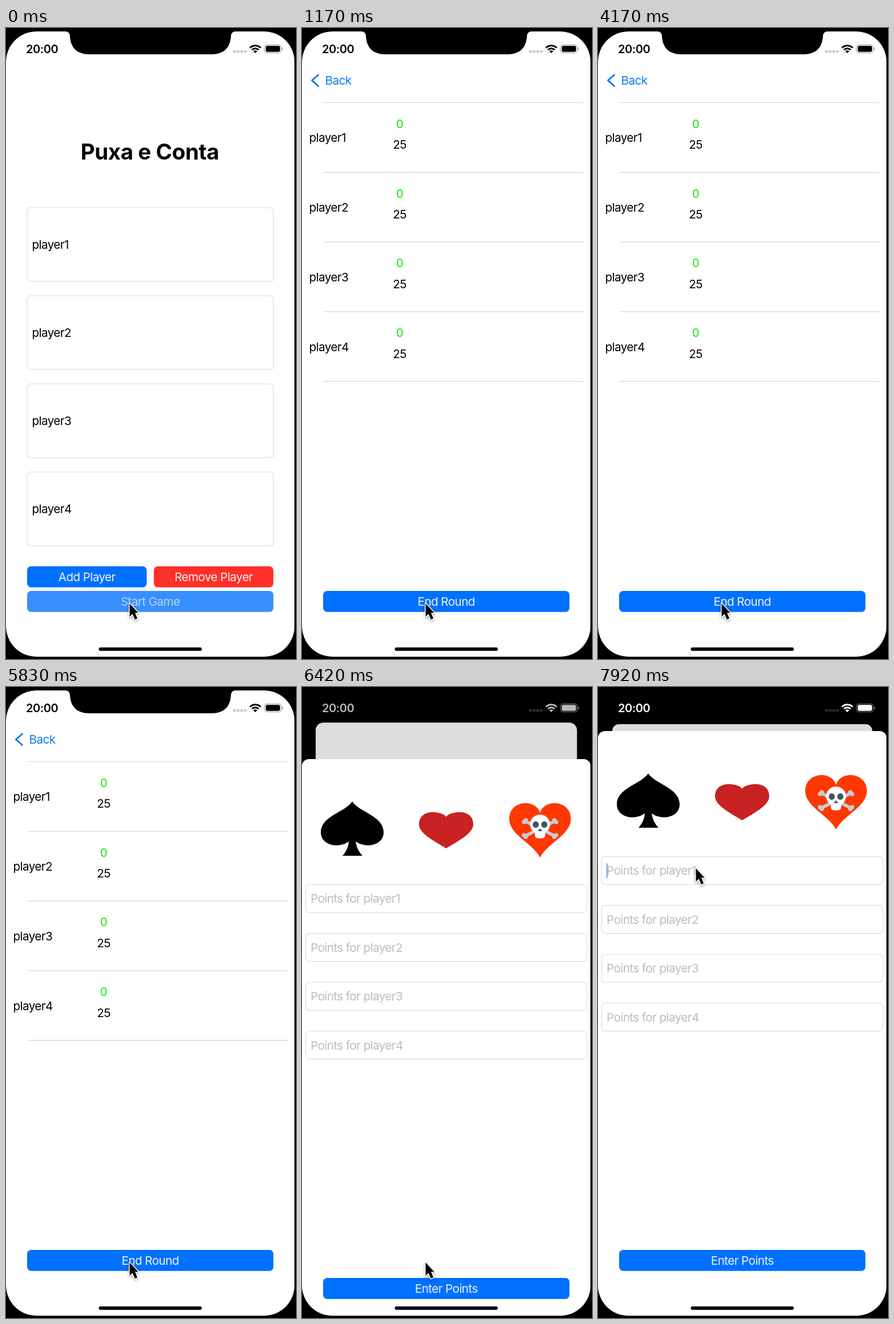
Recreate the animation shown at these times as an HTML page with a canvas. Size 508 by 1103 pixels, loop 8000 ms.

```html
<!DOCTYPE html>
<html lang="en">
<head>
<meta charset="utf-8">
<title>Score keeper</title>
<style>
html, body { margin: 0; height: 100%; overflow: hidden; background: #000; }
canvas { display: block; }
</style>
</head>
<body>
<canvas id="stage" width="508" height="1103"></canvas>
<script>
const LOOP = 8000, FPS = 12;
const BLUE = '#0070ff', RED = '#ff3029';
const WIDTH = 505.5, TOP = 6, BOTTOM = 1099, CORNER = 53, SHEET_TOP = 77;
const PUSH_START = 223, SHEET_START = 6144.3;
const c = document.getElementById('stage').getContext('2d');

const clamp = v => Math.max(0, Math.min(1, v));
const mix = (a, b, p) => a + (b - a) * p;
const ramp = (t, a, b) => clamp((t - a) / (b - a));
const smooth = p => p * p * (3 - 2 * p);
const gray = v => `rgb(${v},${v},${v})`;
const blend = (a, b, p) => `rgb(${a.map((v, i) => Math.round(mix(v, b[i], p)))})`;

// Critically damped spring: share of the way still to go
function remaining(t, start) {
  const x = Math.max(0, t - start) * 0.01762;
  return (1 + x) * Math.exp(-x);
}

function layer(draw) {
  c.save();
  draw();
  c.restore();
}

function box(x, y, w, h, r, fill, stroke) {
  c.beginPath();
  c.roundRect(x, y, w, h, r);
  if (fill) { c.fillStyle = fill; c.fill(); }
  if (stroke) { c.strokeStyle = stroke; c.lineWidth = 1.1; c.stroke(); }
}

function shape(d, fill) {
  c.fillStyle = fill;
  c.fill(new Path2D(d));
}

function line(points, color, width) {
  c.beginPath();
  points.forEach(([x, y]) => c.lineTo(x, y));
  c.strokeStyle = color;
  c.lineWidth = width;
  c.stroke();
}

function disc(x, y, rx, ry, fill) {
  c.beginPath();
  c.ellipse(x, y, rx, ry, 0, 0, 7);
  c.fillStyle = fill;
  c.fill();
}

// y is the middle of the capitals
function text(s, x, y, color = '#000', align = 'left', size = 20.7, weight = 400, spacing = -0.6) {
  c.font = `${weight} ${size}px Inter, sans-serif`;
  c.letterSpacing = spacing + 'px';
  c.textAlign = align;
  c.fillStyle = color;
  c.fillText(s, x, y + size * 0.355);
}

function button(label, x, y, w, color = BLUE, press = 0) {
  layer(() => {
    c.globalAlpha = 1 - 0.22 * press;
    box(x, y, w, 36.7, 7, color);
    text(label, x + w / 2, y + 18.2, `rgba(255,255,255,${0.92 - 0.12 * press})`, 'center');
  });
}

function startPage(t) {
  c.fillStyle = '#fff';
  c.fillRect(0, 0, WIDTH, 1103);
  text('Puxa e Conta', 252, 216.5, '#000', 'center', 38.5, 700, -0.4);
  for (let i = 0; i < 4; i++) {
    const y = 314 + i * 154;
    box(37, y, 431.5, 129, 6, null, '#d9d9d9');
    text('player' + (i + 1), 45.5, y + 64.5);
  }
  button('Add Player', 37, 941, 209.5);
  button('Remove Player', 259, 941, 209.5, RED);
  button('Start Game', 37, 984, 431.5, BLUE, 1 - ramp(t, 0, 250));
}

function scorePage(t) {
  c.fillStyle = '#fff';
  c.fillRect(0, 0, WIDTH + 20, 1103);
  for (let i = 0; i < 5; i++) {
    const y = 130.5 + i * 121.8;
    line([[37, y], [493, y]], '#d4d4d4', 1.2);
    if (i == 4) break;
    text('player' + (i + 1), 12.5, y + 61.5);
    text('0', 171, y + 37, '#08ee08', 'center');
    text('25', 171, y + 73.5, '#000', 'center');
  }
  const press = ramp(t, 5880, 5960) - ramp(t, 6100, 6300);
  button('End Round', 37, 984, 431.5, BLUE, press);
}

function backLink(rest, tint) {
  layer(() => {
    c.globalAlpha = 1 - rest;
    c.lineCap = c.lineJoin = 'round';
    const blue = [14, 122, 242];
    line([[28.5, 82], [17.5, 91.7], [28.5, 101.5]], blend(blue, [150, 150, 150], tint), 2.9);
    text('Back', 40.5 + 52 * rest, 91.7, blend(blue, [130, 140, 150], tint * 0.6));
  });
}

function skull() {
  c.lineCap = 'round';
  for (const s of [-1, 1]) {
    line([[417 - 25 * s, 186], [417 + 25 * s, 211]], '#c3ced5', 5.5);
    for (const [dx, y] of [[28, 187], [25, 184], [28, 210], [25, 213]])
      disc(417 + dx * s, y, 3.8, 3.8, '#c3ced5');
  }
  disc(417, 191, 17.5, 17, '#fff');
  box(408, 200, 18, 15.5, 5, '#fff');
  for (const x of [409.5, 424.5]) disc(x, 191.5, 5.3, 5.8, '#3f5360');
  shape('M417 198l4 5h-8z', '#3f5360');
}

function sheet(t) {
  box(0, SHEET_TOP, WIDTH, 1200, [12, 12, 0, 0], '#fff');
  shape('M88 151C100 170 143 176 143 205C143 228 112 234 94 221C96 233 100 240 106 246H71C76 240 81 233 82 221C64 234 33 228 33 205C33 176 76 170 88 151Z', '#000');
  shape('M252.5 178C258 168 300 162 300 191C300 208 270 222 252.5 233C235 222 205 208 205 191C205 162 247 168 252.5 178Z', '#c82223');
  shape('M417 171C424 146 471 148 471 182C471 209 430 224 417 249C404 224 363 209 363 182C363 148 410 146 417 171Z', '#ff3700');
  layer(skull);
  for (let i = 0; i < 4; i++) {
    const y = 296.5 + i * 85.4;
    box(6.5, y, 492.5, 48.7, 6, null, '#d9d9d9');
    text('Points for player' + (i + 1), 15, y + 24.5, '#bdbdbd');
  }
  button('Enter Points', 37, 984, 431.5);
  if (t > 7490) {
    const fade = 1 - 0.45 * ramp(t, 7800, 7910);
    box(14.5, 308, 2.6, 26, 1, `rgba(50,120,225,${fade})`);
  }
}

function statusBar(light) {
  const ink = gray(Math.round(255 * light));
  text('20:00', 35, 36.7, ink, 'left', 20, 600, -0.4);
  const dots = gray(Math.round(mix(199, 48, clamp(light * 1.35))));
  for (let i = 0; i < 4; i++) box(398 + i * 6.2, 38.7, 4.8, 4.8, 1.8, dots);
  layer(() => {
    c.beginPath();
    c.moveTo(436.7, 44);
    c.arc(436.7, 44, 15, -Math.PI * 0.75, -Math.PI * 0.25);
    c.clip();
    for (const r of [13.2, 8.2]) {
      c.beginPath();
      c.arc(436.7, 44, r, 0, 7);
      c.strokeStyle = ink;
      c.lineWidth = 3;
      c.stroke();
    }
    disc(436.7, 44, 4.7, 4.7, ink);
  });
  box(453, 29.5, 29, 14, 4, null, gray(Math.round(mix(150, 120, light))));
  box(455, 31.3, 25, 10.4, 2.4, ink);
  box(483.4, 34.3, 1.6, 4.6, 1, gray(140));
}

function cursor(t) {
  const p = smooth(ramp(t, 6750, 7300));
  layer(() => {
    c.translate(mix(216.5, 171.5, p), mix(1006, 317, p));
    const arrow = new Path2D('M0 0V23L5.2 18.3L9.2 28L13.6 26.2L9.6 16.2H15.2Z');
    c.lineJoin = 'round';
    c.shadowColor = 'rgba(0,0,0,.35)';
    c.shadowBlur = 4;
    c.shadowOffsetY = 2;
    c.strokeStyle = '#fff';
    c.lineWidth = 3;
    c.stroke(arrow);
    c.shadowColor = 'transparent';
    c.fill(arrow);
  });
}

function render(t) {
  const pushRest = remaining(t, PUSH_START), pushed = 1 - pushRest;
  const sheetRest = remaining(t, SHEET_START), raised = 1 - sheetRest;
  c.fillStyle = '#000';
  c.fillRect(0, 0, 508, 1103);

  layer(() => {
    c.beginPath();
    c.roundRect(0, TOP, WIDTH, BOTTOM - TOP, CORNER);
    c.clip();

    layer(() => {
      // The page behind the sheet shrinks and sinks
      const scale = 1 - 0.099 * raised;
      c.translate(WIDTH / 2 * (1 - scale), TOP + 59 * raised);
      c.scale(scale, scale);
      c.translate(0, -TOP);
      c.beginPath();
      c.roundRect(0, TOP, WIDTH, BOTTOM - TOP, mix(CORNER, 13, raised));
      c.clip();
      if (pushRest > 0.001) layer(() => {
        c.translate(-152 * pushed, 0);
        startPage(t);
        c.fillStyle = `rgba(0,0,0,${0.105 * pushed})`;
        c.fillRect(0, 0, 700, 1103);
      });
      layer(() => {
        c.translate(WIDTH * pushRest, 0);
        scorePage(t);
      });
      backLink(pushRest, clamp(raised * 1.7));
      c.fillStyle = `rgba(0,0,0,${0.14 * raised})`;
      c.fillRect(0, 0, 508, 1103);
    });

    if (raised > 0) layer(() => {
      c.translate(0, (1103 - SHEET_TOP) * sheetRest);
      sheet(t);
    });
  });

  shape('M104 0V6Q111 6 112 14C113 34 124 46 146 46H360C382 46 393 34 394 14Q395 6 402 6V0Z', '#000');
  statusBar(ramp(t, 6200, 6500));
  box(162.5, 1082.7, 180.5, 6, 3, '#000');
  cursor(t);
}

function tick() {
  const now = performance.now() % LOOP;
  render(Math.floor((now + 5) * FPS / 1000) * 1000 / FPS % LOOP);
  requestAnimationFrame(tick);
}
tick();
</script>
</body>
</html>
```
